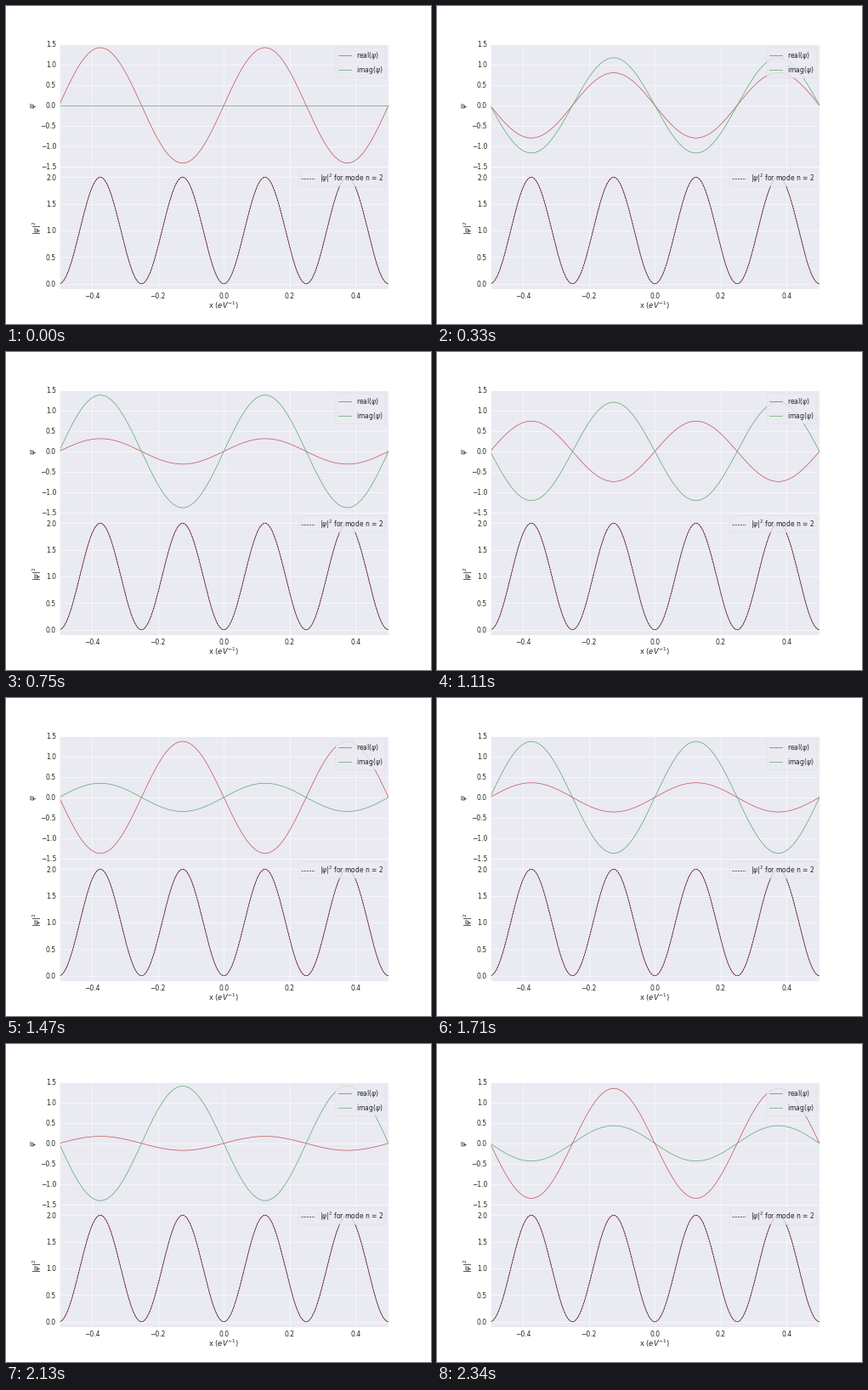
A matplotlib script for the animation above (2370 ms loop, 500 by 374 pixels).

```python
import numpy as np
import matplotlib.pyplot as plt
from matplotlib.animation import FuncAnimation
from matplotlib.patches import FancyBboxPatch

W, H, DPI = 500, 374, 50
FRAMES, INTERVAL = 79, 30
MODE, DT = 2, 0.0025
PANEL, INK = "#EAEAF2", "#262626"
RED, GREEN, BLACK = "#C44E52", "#55A868", "#101018"

plt.rcParams.update({
    "font.family": "DejaVu Sans",
    "font.size": 11,
    "text.color": INK,
    "xtick.color": INK,
    "ytick.color": INK,
    "axes.unicode_minus": True,
})

# Stationary state of a particle on a unit interval
x = np.linspace(-0.5, 0.5, 501)
k = 2 * np.pi * MODE
energy = k ** 2 / 2
shape = np.sqrt(2) * np.sin(k * x)


def psi(frame):
    return shape * np.exp(-1j * energy * DT * frame)


fig = plt.figure(figsize=(W / DPI, H / DPI), dpi=DPI, facecolor="white")


def make_panel(bottom, ylim, yticks):
    ax = fig.add_axes([0.125, bottom, 0.775, 0.385], facecolor=PANEL)
    ax.set_xlim(-0.5, 0.5)
    ax.set_ylim(*ylim)
    ax.set_xticks([-0.4, -0.2, 0, 0.2, 0.4])
    ax.set_yticks(yticks)
    ax.set_axisbelow(True)
    ax.grid(color="white", lw=0.8)
    ax.tick_params(length=0)
    ax.tick_params(axis="x", pad=5.5)
    ax.tick_params(axis="y", pad=5)
    for spine in ax.spines.values():
        spine.set(color="white", linewidth=1.0)
    return ax


top = make_panel(0.495, (-1.5, 1.5), np.arange(-1.5, 1.6, 0.5))
low = make_panel(0.11, (-0.1, 2.2), np.arange(0, 2.1, 0.5))
top.tick_params(labelbottom=False)

real_line, = top.plot(x, psi(0).real, color=RED, lw=1)
imag_line, = top.plot(x, psi(0).imag, color=GREEN, lw=1)
prob_line, = low.plot(x, np.abs(psi(0)) ** 2, color=RED, lw=1)
low.plot(x, shape ** 2, "--", color=BLACK, lw=0.85)

# Labels and legends sit on a layer measured in pixels from the top left
layer = fig.add_axes([0, 0, 1, 1])
layer.set_xlim(0, W)
layer.set_ylim(H, 0)
layer.axis("off")


def legend_box(x0, y0, x1, y1):
    layer.add_patch(FancyBboxPatch(
        (x0, y0), x1 - x0, y1 - y0,
        boxstyle="round,pad=0,rounding_size=1.5",
        facecolor=PANEL, edgecolor="0.85", lw=0.7, alpha=0.8))


def legend_entry(text_x, baseline, label, **style):
    y = baseline - 2.6
    layer.plot([text_x - 21.4, text_x - 6.1], [y, y], **style)
    layer.text(text_x, baseline, label, va="baseline")


legend_box(388, 48.8, 446.2, 84.6)
legend_entry(412.5, 61, r"real($\psi$)", color=RED, lw=1)
legend_entry(412.5, 78, r"imag($\psi$)", color=GREEN, lw=1)
legend_box(344.2, 192.8, 446.2, 212)
legend_entry(368.7, 206, rf"$|\psi|^2$ for mode n = {MODE}",
             color=BLACK, lw=0.85, ls="--")

layer.text(256.2, 356, r"x ($eV^{-1}$)", size=12, ha="center", va="baseline")
for lx, ly, label in [(32, 117, r"$\psi$"), (37, 261, r"$|\psi|^2$")]:
    layer.text(lx, ly, label, size=12, rotation=90, ha="center", va="center")


def update(frame):
    wave = psi(frame)
    real_line.set_ydata(wave.real)
    imag_line.set_ydata(wave.imag)
    prob_line.set_ydata(np.abs(wave) ** 2)
    return real_line, imag_line, prob_line


anim = FuncAnimation(fig, update, frames=FRAMES, interval=INTERVAL,
                     repeat=True, repeat_delay=0, blit=False)
plt.show()
```
